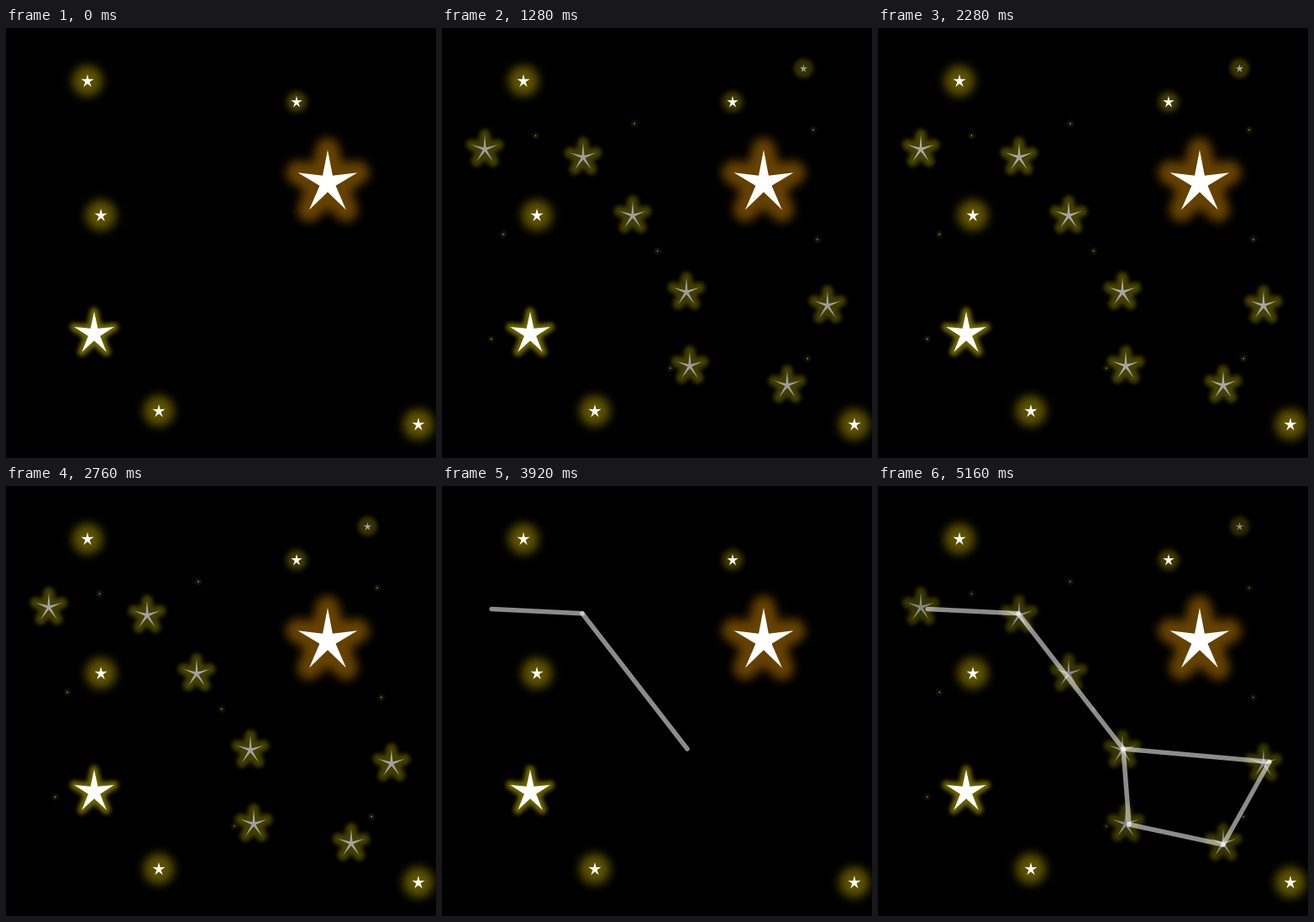
Write an HTML page that moves like this. It is 512 px wide and 512 px high and loops after 5200 ms.

```html
<!DOCTYPE html>
<html lang="en">
<head>
<meta charset="utf-8">
<title>Constellation</title>
<style>
  html, body { margin: 0; width: 100%; height: 100%; overflow: hidden; background: #000; }
  svg { display: block; width: 100vw; height: 100vh; }
</style>
</head>
<body>
<svg id="sky" viewBox="0 0 512 512"></svg>
<script>
const LOOP = 5200, STEP = 40, TWINKLE = 490;
const sky = document.getElementById('sky');

function add(parent, tag, attrs = {}) {
  const node = document.createElementNS('http://www.w3.org/2000/svg', tag);
  for (const key in attrs) node.setAttribute(key, attrs[key]);
  parent.appendChild(node);
  return node;
}

const defs = add(sky, 'defs');

function blur(sigma) {
  const id = 'blur' + String(sigma).replace('.', '_');
  if (!document.getElementById(id)) {
    const filter = add(defs, 'filter', {
      id, x: '-100%', y: '-100%', width: '300%', height: '300%',
      'color-interpolation-filters': 'sRGB'
    });
    add(filter, 'feGaussianBlur', { stdDeviation: sigma });
  }
  return `url(#${id})`;
}

function starPoints(cx, cy, r, inner) {
  return Array.from({ length: 10 }, (_, i) => {
    const a = (i / 5 - 0.5) * Math.PI, d = i % 2 ? r * inner : r;
    return (cx + d * Math.cos(a)).toFixed(2) + ',' + (cy + d * 1.06 * Math.sin(a)).toFixed(2);
  }).join(' ');
}

// Star with a halo that follows its outline.
function outlinedStar(parent, x, y, r, inner, color, spread, sigma) {
  const points = starPoints(x, y, r, inner);
  add(parent, 'polygon', {
    points, fill: color, stroke: color, 'stroke-width': spread * 2,
    'stroke-linejoin': 'round', filter: blur(sigma)
  });
  add(parent, 'polygon', { points, fill: '#fff' });
}

// Small star with a round halo.
function roundStar(parent, x, y, r, halo, color, sigma) {
  add(parent, 'circle', { cx: x, cy: y, r: halo, fill: color, filter: blur(sigma) });
  add(parent, 'polygon', { points: starPoints(x, y + 0.4, r, 0.34), fill: '#fff' });
}

const steady = add(sky, 'g');
outlinedStar(steady, 383, 184.5, 37.3, 0.27, '#664200', 14, 6);
outlinedStar(steady, 105, 364.3, 25, 0.3, '#6c6400', 5, 2.5);
for (const [x, y] of [[97, 63], [113, 223], [182, 456], [491, 472]])
  roundStar(steady, x, y, 8, 18, '#5e5300', 6);
roundStar(steady, 346, 88, 7, 12, '#443d00', 3.5);

const twinkling = add(sky, 'g');
for (const [x, y] of [[51, 144.5], [168, 154], [227, 223.5], [291, 314.5],
                      [459, 330.5], [295, 402.5], [411, 425.5]])
  outlinedStar(twinkling, x, y, 16.5, 0.16, '#6c6600', 6.5, 2.8);
const lateStar = add(twinkling, 'g');
roundStar(lateStar, 430.5, 48, 5, 11.5, '#565000', 2.5);

// Faint dots on a loosely jittered 3 x 3 grid.
const jitter = seed => 70 * (Math.abs(Math.sin(seed * 12.9898) * 43758.5453) % 1 - 0.5);
for (let i = 0; i < 9; i++) {
  const cx = 82 + 178 * (i % 3) + jitter(i + 1);
  const cy = 110 + 130 * Math.floor(i / 3) + jitter(i + 20);
  add(twinkling, 'circle', { cx, cy, r: 3.8, fill: '#2e2a00', filter: blur(0.8) });
  add(twinkling, 'circle', { cx, cy, r: 0.8, fill: '#fffbb0' });
}

// The figure is drawn joint by joint: a slow handle, then a quicker bowl that closes.
const FADE = 12, DRAW_START = 2940, HANDLE_TIME = 490, BOWL_TIME = 300;
const joints = [[59, 146.5], [167, 151.8], [292, 313], [299, 403], [411, 427], [466, 328.5]];
const BOWL = 2;

const lines = joints.map(([x1, y1], i) => {
  const [x2, y2] = joints[i + 1] || joints[BOWL];
  const length = Math.hypot(x2 - x1, y2 - y1);
  const gradient = add(defs, 'linearGradient', { id: 'wipe' + i, gradientUnits: 'userSpaceOnUse' });
  add(gradient, 'stop', { offset: 0, 'stop-color': '#fff' });
  add(gradient, 'stop', { offset: 1, 'stop-color': '#fff', 'stop-opacity': 0 });
  const node = add(sky, 'line', {
    x1, y1, x2, y2, stroke: `url(#wipe${i})`, 'stroke-width': 5.5,
    'stroke-linecap': 'round', 'stroke-opacity': 0.55
  });
  return {
    x1, y1, ux: (x2 - x1) / length, uy: (y2 - y1) / length, length, gradient, node,
    start: DRAW_START + HANDLE_TIME * Math.min(i, BOWL) + BOWL_TIME * Math.max(0, i - BOWL),
    duration: i < BOWL ? HANDLE_TIME : BOWL_TIME
  };
});

function wipe({ x1, y1, ux, uy, length, gradient, node, start, duration }, time) {
  const p = Math.min(1, Math.max(0, (time - start) / duration));
  node.setAttribute('visibility', p > 0 ? 'visible' : 'hidden');
  const head = -3 + p * (length + FADE + 6), tail = head - FADE;
  gradient.setAttribute('x1', x1 + ux * tail);
  gradient.setAttribute('y1', y1 + uy * tail);
  gradient.setAttribute('x2', x1 + ux * head);
  gradient.setAttribute('y2', y1 + uy * head);
}

function render(time) {
  twinkling.setAttribute('opacity', (time % TWINKLE) / TWINKLE);
  lateStar.setAttribute('visibility', time < TWINKLE ? 'hidden' : 'visible');
  lines.forEach(line => wipe(line, time));
}

const origin = performance.now();
function tick() {
  const time = Math.max(0, performance.now() - origin) % LOOP;
  render(Math.floor(time / STEP) * STEP);
  requestAnimationFrame(tick);
}
render(0);
requestAnimationFrame(tick);
</script>
</body>
</html>
```
